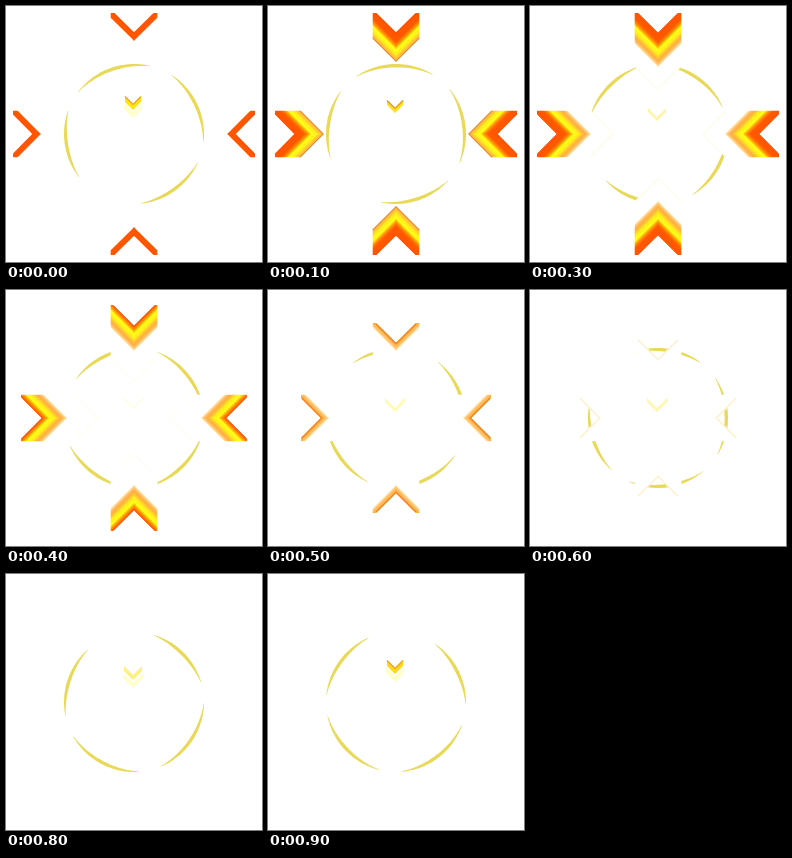
Animation of 256 by 256 pixels, one loop 1000 ms. Source, as an HTML page with a canvas:

```html
<!DOCTYPE html>
<html lang="en">
<head>
<meta charset="utf-8">
<title>Converging arrows</title>
<style>
html, body { margin: 0; width: 100%; height: 100%; overflow: hidden; background: #fff; }
canvas { display: block; width: 100vmin; height: 100vmin; }
</style>
</head>
<body>
<canvas id="stage" width="256" height="256"></canvas>
<script>
const ctx = document.getElementById('stage').getContext('2d');
const STEP = 100, STEPS = 10, C = 128, HALF = 23.3;

// Heat colours by distance along the arrow axis
const HEAT = [[26, '#ff5200'], [36, '#ff5a00'], [40, '#ff9400'], [44, '#ffff18'],
  [49, '#ffec1c'], [52, '#ffc830'], [55, '#ffac44'], [59, '#ffcc78'], [61, '#fff4d8'],
  [62, '#fff'], [96, '#fff']];

// Per step: base, notch, tip, rim at the notch, rim at the tip
const ARROWS = [
  [7, 26.5, 35, '', ''],
  [7, 26.5, 56, '', '#e07a30'],
  [7, 26.5, 73, '', '#fff6b8'],
  [7, 27, 84, '#ff5a10', '#fffbdc'],
  [15, 36, 92, '#ff5a10', '#fffde8'],
  [33, 53, 96, '#f58220', ''],
  [49, 69, 96, '#fff0c8', ''],
  [57, 79, 96, '#fffbe8', '']
];

// Per step: top, half width, arm height, fill, rim, pale echo below
const MARKS = [
  [90, 8, 6, '#ffe414', '#f0a020', 1],
  [94, 8, 5, '#ffe020', '#e89428', 0],
  [96, 8, 5, '#ffe030', '#e0a030', 0],
  [102, 9, 4, '#fff4a8', '', 0],
  [107, 10, 2, '#ffffdc', '', 0],
  [108, 10, 4, '#fffab4', '', 0],
  [108, 10, 4, '#fff6b0', '', 0],
  [107, 10, 4, '#fff0a4', '', 0],
  [92, 9, 5, '#fff080', '', 1],
  [86, 8, 6, '#ffd81c', '#f0a020', 1]
];

// Start and end of each crescent in degrees
const ARCS = [[0, 58], [75, 142], [160, 225], [242, 303]];

function poly(points, fill) {
  ctx.beginPath();
  points.forEach(([x, y]) => ctx.lineTo(x, y));
  ctx.closePath();
  ctx.fillStyle = fill;
  ctx.fill();
}

function line(points, color, width) {
  ctx.beginPath();
  points.forEach(([x, y]) => ctx.lineTo(x, y));
  ctx.strokeStyle = color;
  ctx.lineWidth = width;
  ctx.stroke();
}

function ring(start) {
  const rad = Math.PI / 180, n = 40;
  for (const [from, to] of ARCS) {
    const pts = [];
    for (let i = 0; i <= 2 * n; i++) {
      const u = i <= n ? i / n : 2 - i / n;
      const a = (start + from + (to - from) * u) * rad;
      const r = 70 - (i <= n ? 0 : 0.4 + 3 * Math.sin(Math.PI * u));
      pts.push([C + r * Math.cos(a), C + r * Math.sin(a)]);
    }
    poly(pts, '#e8da58');
  }
}

function heat(side) {
  const a = HEAT[0][0], b = HEAT[HEAT.length - 1][0], d = (b - a) / 2;
  const g = ctx.createLinearGradient(0, a, side * d, a + d);
  for (const [t, color] of HEAT) g.addColorStop((t - a) / (b - a), color);
  return g;
}

function arrow([base, notch, tip, backRim, frontRim]) {
  const cut = Math.min(HALF, notch - base);
  for (const side of [-1, 1]) {
    // Slight overlap hides the seam on the axis
    const pts = [[-side * 0.3, notch], [-side * 0.3, tip], [side * HALF, tip - HALF],
      [side * HALF, Math.max(base, notch - HALF)], [side * cut, notch - cut]];
    poly(pts, heat(side));
  }
  const edge = (t, w) => [[-w, t - w], [0, t], [w, t - w]];
  if (backRim) line(edge(notch + 0.7, cut), backRim, 1.3);
  if (frontRim) line(edge(tip - 0.7, HALF), frontRim, 1);
}

function vee(top, w, h, fill) {
  poly([[-w, top], [0, top + w], [w, top], [w, top + h], [0, top + w + h], [-w, top + h]], fill);
}

function mark([top, w, h, fill, rim, echo]) {
  if (echo) vee(top + 7, w + 1, h, '#ffffcc');
  vee(top, w, h, fill);
  if (rim) line([[-w, top + 0.5], [0, top + w + 0.5], [w, top + 0.5]], rim, 1.2);
}

function draw(step) {
  ctx.fillStyle = '#fff';
  ctx.fillRect(0, 0, 256, 256);
  ring(142 + 18 * step);
  if (ARROWS[step]) {
    for (let k = 0; k < 4; k++) {
      ctx.save();
      ctx.translate(C, C);
      ctx.rotate(k * Math.PI / 2);
      ctx.translate(0, -C);
      arrow(ARROWS[step]);
      ctx.restore();
    }
  }
  ctx.save();
  ctx.translate(127, 0);
  mark(MARKS[step]);
  ctx.restore();
}

const t0 = performance.now();
function tick() {
  draw(Math.floor((performance.now() - t0) / STEP) % STEPS);
  requestAnimationFrame(tick);
}
tick();
</script>
</body>
</html>
```
